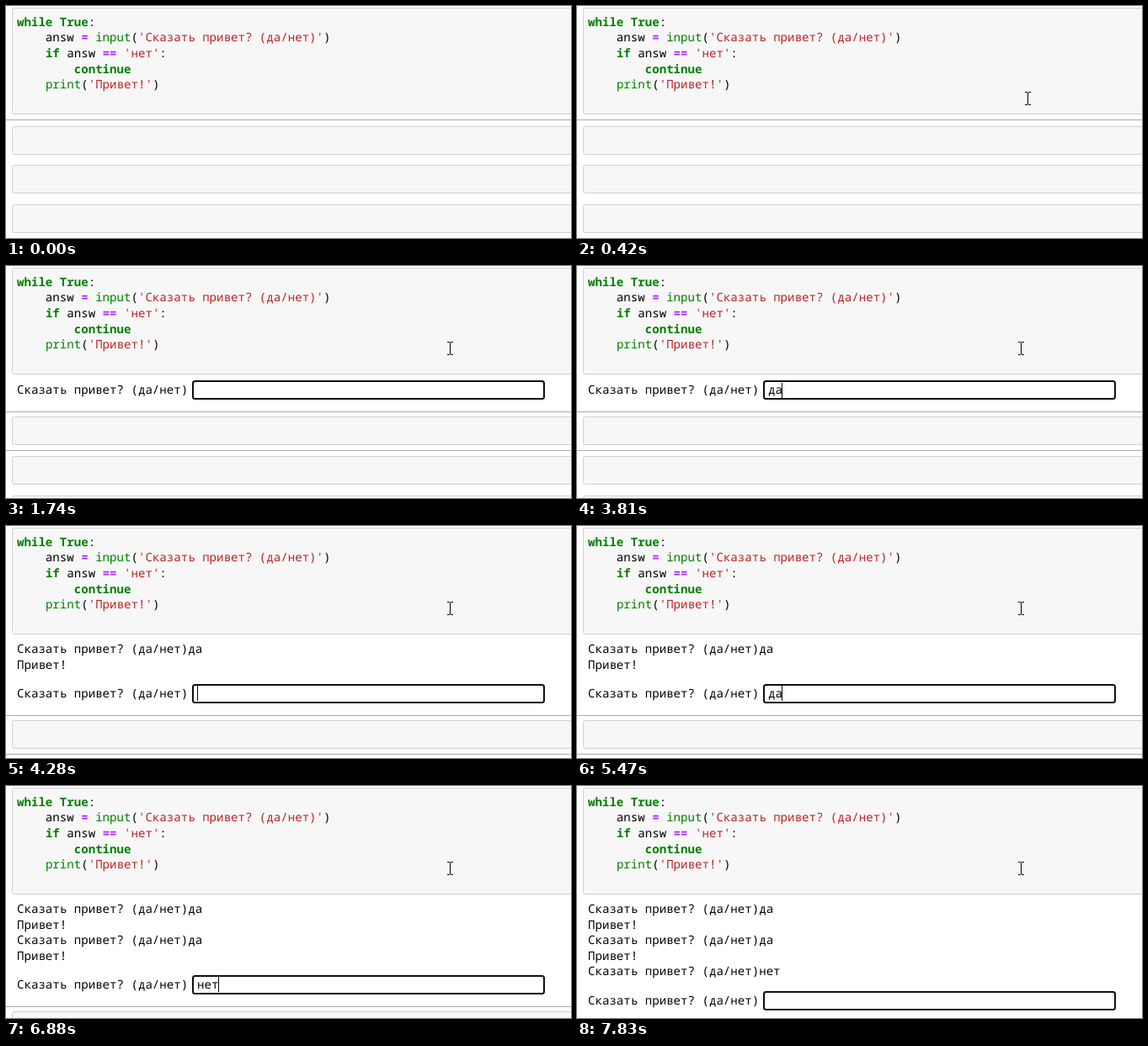
An HTML page that plays this animation: 671x276 px, repeating every 8 s.

```html
<!DOCTYPE html>
<html lang="ru">
<head>
<meta charset="utf-8">
<title>Цикл while и continue</title>
<style>
  html, body { margin: 0; width: 100%; height: 100%; overflow: hidden; background: #fff; }
  svg { display: block; width: 671px; height: 276px; }
  text {
    font: 14.11px "Noto Sans Mono", "DejaVu Sans Mono", monospace;
    white-space: pre;
    text-rendering: geometricPrecision;
    fill: #000;
  }
  .cell { fill: #f7f7f7; stroke: #cfcfcf; }
  .edge { stroke: #ababab; }
  .kw { fill: #008000; font-weight: 700; }
  .fn { fill: #008000; }
  .op { fill: #a2f; font-weight: 700; }
  .str { fill: #ba2121; }
  .box { fill: #fff; stroke: #101010; stroke-width: 2; }
  .beam { fill: none; stroke: #000; }
</style>
</head>
<body>
<svg viewBox="0 0 671 276">
  <rect class="cell" x="7.5" y="2.5" width="700" height="126" rx="2"/>
  <text x="13" y="24"><tspan class="kw">while</tspan> <tspan class="kw">True</tspan>:</text>
  <text x="13" y="42">    answ <tspan class="op">=</tspan> <tspan class="fn">input</tspan>(<tspan class="str">'Сказать привет? (да/нет)'</tspan>)</text>
  <text x="13" y="61">    <tspan class="kw">if</tspan> answ <tspan class="op">==</tspan> <tspan class="str">'нет'</tspan>:</text>
  <text x="13" y="80">        <tspan class="kw">continue</tspan></text>
  <text x="13" y="98">    <tspan class="fn">print</tspan>(<tspan class="str">'Привет!'</tspan>)</text>
  <g id="below"></g>
  <g id="output"></g>
  <g id="prompt">
    <text x="13" y="16">Сказать привет? (да/нет)</text>
    <rect class="box" x="222" y="1" width="417" height="21" rx="2.5"/>
    <text id="typed" x="227" y="16"></text>
    <rect id="caret" y="2.5" width="1" height="18"/>
  </g>
  <path id="pointer" class="beam" d="M-3 -7.5H0M1 -7.5H4M-3 7.5H0M1 7.5H4M.5 -7V7"/>
</svg>
<script>
const LOOP = 8000, CHAR = 8.466, LINE = 18.6;
const ASK = 'Сказать привет? (да/нет)', HELLO = 'Привет!';
const LOG = [ASK + 'да', HELLO, ASK + 'да', HELLO, ASK + 'нет'];

// [start ms, printed lines, typed text (null: no input), caret shown]
const STEPS = [
  [0, 0, null, 0],
  [1170, 0, '', 1], [1740, 0, '', 0], [2290, 0, '', 1], [2770, 0, '', 0], [3320, 0, '', 1],
  [3670, 0, 'д', 1], [3810, 0, 'да', 1],
  [4280, 2, '', 1], [4810, 2, '', 0], [5270, 2, 'д', 1], [5470, 2, 'да', 1],
  [5800, 4, null, 0], [5860, 4, '', 1], [6350, 4, '', 0],
  [6680, 4, 'н', 1], [6780, 4, 'не', 1], [6880, 4, 'нет', 1],
  [7290, 5, '', 1], [7830, 5, '', 0]
];

const $ = id => document.getElementById(id);
const show = (el, on) => el.setAttribute('visibility', on ? 'visible' : 'hidden');
const move = (el, x, y) => el.setAttribute('transform', `translate(${x} ${y})`);

const edge = y => `<path class="edge" d="M0 ${Math.round(y) + .5}H671"/>`;
const cell = y => `<rect class="cell" x="7.5" y="${Math.round(y) + .5}" width="700" height="33" rx="2"/>`;
const cells = y => [0, 1, 2].map(i => cell(y + 46.6 * i)).join('');

function drawStep([, lines, typed, caret]) {
  const asking = typed !== null;
  const top = lines ? Math.round(150.8 + LINE * lines) : 136;

  $('output').innerHTML = LOG.slice(0, lines)
    .map((s, i) => `<text x="13" y="${Math.round(151 + LINE * i)}">${s}</text>`).join('');

  if (!asking && !lines) {
    $('below').innerHTML = edge(135) + cells(142.6);
  } else {
    const y = asking ? top + 37 : 146 + LINE * lines;
    $('below').innerHTML = edge(y) + edge(y + 46.4) + cells(y + 6.4);
  }

  show($('prompt'), asking);
  move($('prompt'), 0, top);
  $('typed').textContent = typed || '';
  $('caret').setAttribute('x', Math.floor(227 + CHAR * (typed || '').length));
  $('caret').setAttribute('y', lines ? 2 : 3);
  $('caret').setAttribute('opacity', caret);
}

function drawPointer(t) {
  const hop = Math.min(8, Math.floor(t / 70));
  const left = (1 - hop / 8) ** 2;
  show($('pointer'), hop > 0);
  move($('pointer'), Math.round(527 + 120 * left), Math.round(98 + 190 * left));
}

let current;
function frame(now) {
  const t = now % LOOP;
  const step = STEPS.findLast(s => s[0] <= t);
  if (step !== current) drawStep(current = step);
  drawPointer(t);
  requestAnimationFrame(frame);
}
const start = performance.now();
const tick = now => Math.max(0, now - start);
(function run(now) {
  const t = tick(now) % LOOP;
  const step = STEPS.findLast(s => s[0] <= t);
  if (step !== current) drawStep(current = step);
  drawPointer(t);
  requestAnimationFrame(run);
})(start);
</script>
</body>
</html>
```
